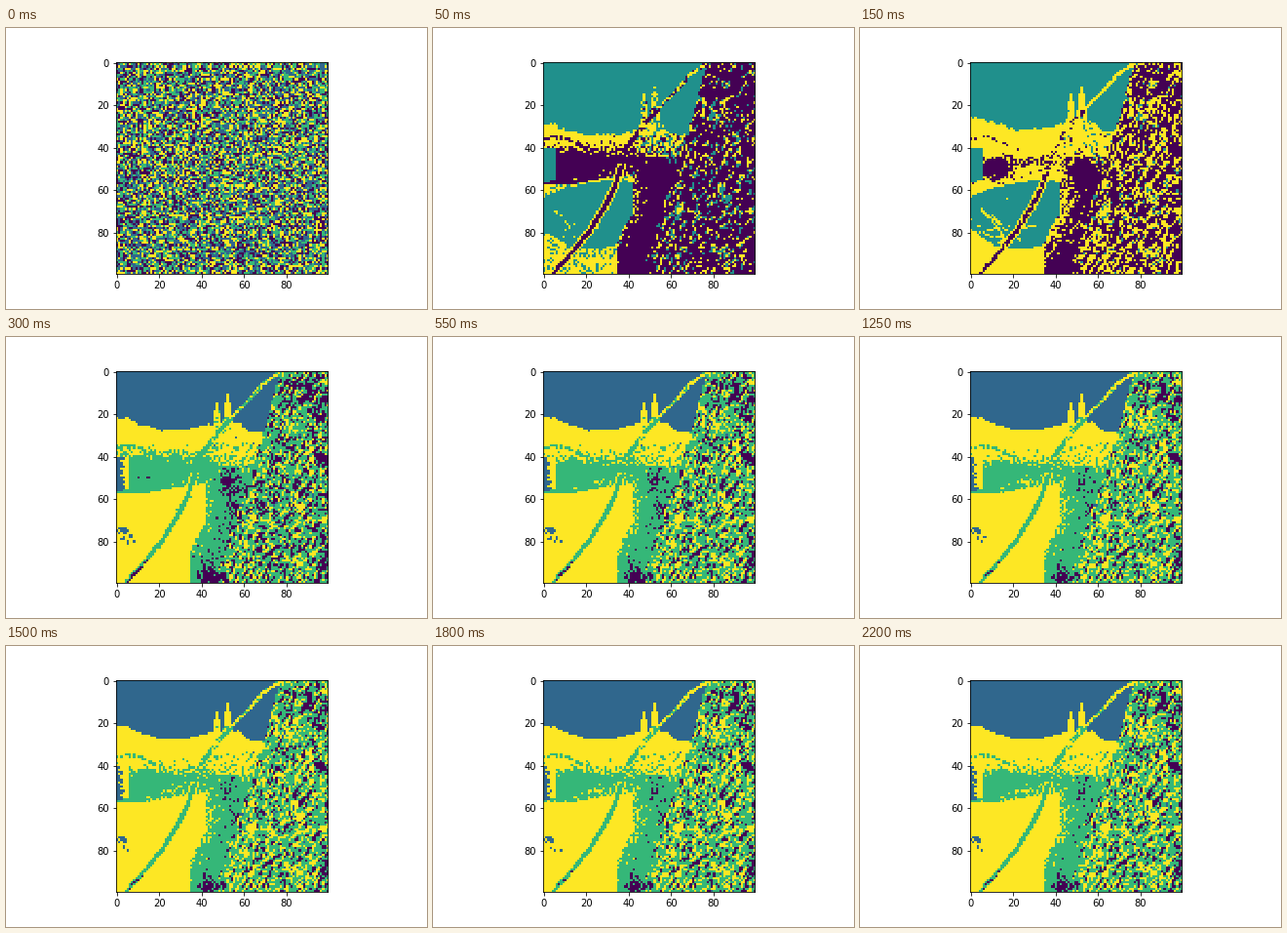
These frames come from a looping animation (432 px wide and 288 px high, 2300 ms). A matplotlib script:

```python
import numpy as np
import matplotlib.pyplot as plt
from matplotlib.animation import FuncAnimation

N = 100
FRAMES = 46
rng = np.random.default_rng(7)
Y, X = np.mgrid[0:N, 0:N].astype(float)


def curve(at, knots, values):
    return np.interp(at, knots, values)


def noise(sd):
    return rng.normal(0, sd, (N, N))


def blob(cx, cy, rx, ry):
    return np.exp(-((X - cx) / rx) ** 2 - ((Y - cy) / ry) ** 2)


def stroke(field, points, value, wide=1, sd=0.0, skip=0.0):
    """Paint a polyline, optionally uneven or broken."""
    xs, ys = np.array(points, float).T
    path = np.r_[0, np.cumsum(np.hypot(np.diff(xs), np.diff(ys)))]
    s = np.arange(0, path[-1], 0.4)
    px = np.rint(np.interp(s, path, xs)).astype(int)
    py = np.rint(np.interp(s, path, ys)).astype(int)
    mask = np.zeros((N, N), bool)
    for k in range(wide):
        mask[py.clip(0, N - 1), (px + k - wide // 2).clip(0, N - 1)] = True
    mask &= rng.random((N, N)) >= skip
    field[mask] = (value + noise(sd))[mask]


def streaks():
    """Unit-variance grain drawn out down and to the left."""
    g = noise(1)
    t = g + 0.7 * np.roll(g, 1, 0) + 0.45 * np.roll(g, (2, -1), (0, 1))
    t += 0.3 * np.roll(g, 1, 1)
    return (t - t.mean()) / t.std()


def landscape():
    # Hills under the sky, fading into the dark band
    sky_line = curve(X, [0, 5, 8, 15, 22, 35, 43, 57, 62, 69],
                     [22, 22, 24, 26, 28, 27, 25, 24, 28, 29])
    v = np.maximum(0.75 - 0.021 * (Y - sky_line), 0.57) + noise(0.008)
    band = curve(Y, [33, 44, 60], [0.57, 0.465, 0.46])
    band = band - 0.15 * blob(11, 50, 7, 4.5) - 0.07 * blob(28, 47, 16, 2)
    v = np.where(Y > 34, band + noise(0.028), v)

    inlet = (X < 6) & (Y > 40) & (Y < 57 - X / 3)
    v = np.where(inlet, 0.805 - 0.022 * X + noise(0.012), v)
    stroke(v, [(0, 36), (6, 35), (14, 37), (22, 41)], 0.42, 1, 0.06, 0.3)

    # Shore and bay
    shore = curve(X, [0, 15, 25, 38, 46], [57, 57, 55, 53, 52])
    v = np.where(Y > shore, 0.59 + noise(0.015), v)
    top = curve(X, [0, 10, 20, 33, 40], [63, 59, 57, 55, 56])
    low = curve(X, [0, 6, 12, 25, 34, 38], [79, 83, 87, 88, 86, 80])
    v = np.where((Y > top) & (Y < low), 0.703 + noise(0.012), v)
    for wave in ([(0, 80), (8, 79), (18, 77)], [(4, 68), (11, 76), (17, 85)],
                 [(10, 72), (15, 78), (24, 84)], [(0, 74), (9, 82), (20, 83)],
                 [(13, 85), (23, 78), (30, 77)]):
        stroke(v, wave, 0.61, 1, 0.015, 0.15)
    v += (0.17 * blob(2, 75, 3.2, 1.8) + 0.15 * blob(5, 79, 3.2, 1.6)) \
        * rng.uniform(0.6, 1, (N, N))

    # Middle slope
    bay_edge = curve(Y, [44, 55, 72, 78, 88, 99], [44, 41, 41, 37, 34, 34])
    core = curve(Y, [45, 65, 80, 88, 99], [45, 48, 42, 36, 34])
    slope = 0.415 - np.clip(0.016 * (X - core), -0.075, 0.07) + noise(0.06)
    v = np.where((Y > 44) & (X > bay_edge), slope, v)
    upper = 0.57 - 0.006 * np.maximum(Y - 36, 0) + noise(0.075)
    v = np.where((X > 43) & (Y > 33) & (Y <= 44), upper, v)
    v -= 0.12 * blob(52, 52, 4.5, 5) + 0.17 * blob(57, 66, 4, 6)

    # Wooded cliff
    cliff = curve(Y, [0, 10, 25, 38, 50, 70, 99], [77, 74, 70, 66, 62, 55, 46])
    wood = 0.385 + 0.18 * streaks() + 0.03 * (Y - 50) / 50
    wood -= 0.2 * blob(98, 89, 4, 7) + 0.05 * blob(88, 4, 12, 16)
    v = np.where(X > cliff, wood, v)
    v -= 0.2 * blob(44, 97, 7, 4)

    # Sky
    v = np.where((Y < sky_line) & (X < cliff), 0.95, v)

    # Twin towers
    for cx, tip, grow in ((47, 15, 0.13), (52, 11, 0.13)):
        half = 0.5 + grow * (Y - tip)
        tower = (Y >= tip) & (Y < 35) & (np.abs(X - cx) <= half)
        v = np.where(tower, 0.57 + noise(0.045), v)
    for dx in (0, 3):
        stroke(v, [(52 + dx, 26), (55 + dx, 36), (59 + dx, 47)],
               0.68, 1, 0.04, 0.35)

    # Path winding up to the cliff top
    lower = [(5, 99), (14, 89), (22, 79), (29, 68), (34, 58), (37, 48)]
    middle = [(37, 48), (41, 38), (47, 30), (55, 21)]
    stroke(v, lower, 0.55, 4, 0.02)
    stroke(v, lower, 0.40, 2, 0.025)
    stroke(v, lower[:2], 0.24, 1, 0.04)
    stroke(v, middle, 0.44, 2, 0.06, 0.15)
    stroke(v, [(55, 21), (65, 11), (70, 5), (77, 1)], 0.53, 2, 0.06)
    return v


scene = landscape()
start = rng.integers(0, 4, (N, N)) / 3

# Class limits settle quickly, then creep
STEPS = [1, 2, 3, 4, 5, 6, 10, 18, 44]
DARK = [0.50, 0.455, 0.42, 0.36, 0.31, 0.28, 0.245, 0.225, 0.22]
MID = [0.50, 0.455, 0.42, 0.46, 0.50, 0.52, 0.50, 0.485, 0.48]
LIGHT = [0.60, 0.64, 0.665, 0.70, 0.73, 0.75, 0.76, 0.77, 0.772]


def labels(n):
    if n == 0:
        return start
    n = min(n, FRAMES - 2)
    limits = [curve(n, STEPS, t) for t in (DARK, MID, LIGHT)]
    jitter = np.random.default_rng(100 + n).normal(0, 0.006, (N, N))
    shades = np.array([0, 1, 1, 0.5] if n <= 3 else [0, 2 / 3, 1, 1 / 3])
    return shades[np.digitize(scene + jitter, limits)]


plt.rcParams["font.family"] = "DejaVu Sans"
fig, ax = plt.subplots(figsize=(6, 4), dpi=72)
fig.subplots_adjust(left=0.125, right=0.9, bottom=0.125, top=0.88)
image = ax.imshow(start, cmap="viridis", vmin=0, vmax=1,
                  interpolation="nearest")
ax.set_xticks(range(0, N, 20))
ax.set_yticks(range(0, N, 20))


def update(n):
    image.set_data(labels(n))
    return [image]


anim = FuncAnimation(fig, update, frames=FRAMES, interval=50, repeat=True,
                     repeat_delay=0)
plt.show()
```
